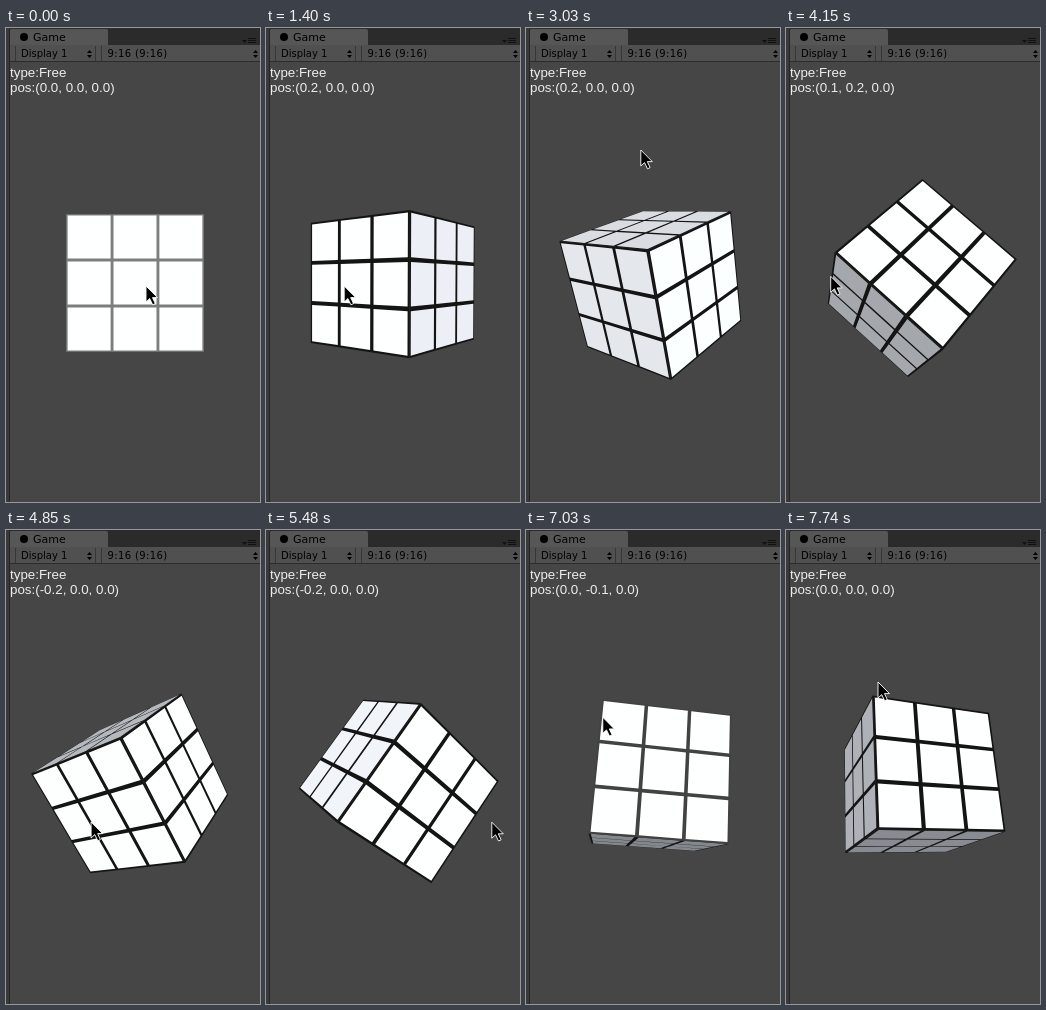
An HTML page that plays this animation: 254 px wide and 474 px high, repeating every 7.99 s.

```html
<!DOCTYPE html>
<html lang="en">
<head>
<meta charset="utf-8">
<title>Cube rotation</title>
<style>
html, body { margin: 0; width: 100%; height: 100%; overflow: hidden; background: #464646; }
svg { display: block; width: 254px; height: 474px; }
.ui { font: 10px "DejaVu Sans", sans-serif; fill: #000; }
.tab { font-size: 11px; }
.ratio { letter-spacing: .37px; }
.log { font: 13.35px "Liberation Sans", Arial, sans-serif; fill: #ececec; }
</style>
</head>
<body>
<svg viewBox="0 0 254 474">
  <rect width="254" height="474" fill="#464646"/>
  <rect width="254" height="17" fill="#2b2b2b"/>
  <path d="M4 17V2Q4 1 6 1H100Q102 1 102 3V17Z" fill="#565656"/>
  <rect y="17" width="254" height="16" fill="#505050"/>
  <path d="M4 33.5H254" stroke="#2c2c2c"/>
  <rect width="3" height="474" fill="#3a3a3a"/>
  <path d="M3.5 2V474" stroke="#242424"/>
  <path d="M9.5 18V33M89.5 18V33M95.5 18V33" stroke="#363636"/>
  <g class="ui">
    <circle cx="18" cy="9" r="4"/>
    <text class="tab" x="27" y="13">Game</text>
    <text x="15" y="29">Display 1</text>
    <text class="ratio" x="101.5" y="29">9:16 (9:16)</text>
    <path d="M81 25L83.5 22L86 25ZM81 27H86L83.5 30ZM247 25L249.5 22L252 25ZM247 27H252L249.5 30Z"/>
    <path d="M236 12H241L238.5 15ZM242 10H250V11H242ZM242 12H250V13H242ZM242 14H250V15H242Z" fill="#111"/>
  </g>
  <g id="cube"></g>
  <text class="log" x="4" y="49">type:Free</text>
  <text class="log" id="pos" x="4" y="64"></text>
  <path id="cursor" d="M0 0V16L3.7 12.6L6.7 18.8L9.3 17.6L6.5 11.6H11.5Z" stroke="#fff" stroke-width=".9"/>
</svg>
<script>
const LOOP = 7990, STEP = 10, HALF = 1.53, DIST = 10, FOCAL = 381, CX = 129, CY = 255;
const DRAG = 0.0096; // radians per pixel
const IDLE = 240, PRESS = 1170;

// Turning points of the drag: time, x, y
const drag = [
  [PRESS, 140, 258], [1630, 17, 258], [1810, 17, 258], [2270, 138, 258], [2330, 138, 258],
  [2880, 150, 122], [3150, 87, 122], [3330, 87, 122], [3840, 60, 218], [4030, 60, 218],
  [4330, 22, 293], [4480, 2, 292], [5480, 226, 292], [5870, 165, 358], [6250, 105, 250],
  [6400, 48, 266], [7210, 85, 165], [7390, 85, 165], [7680, 92, 152], [LOOP, 92, 152]
];

// Cube attitudes: time, yaw, pitch, roll in degrees
const poses = [
  [PRESS, 0, 0, 0], [2330, 13.7, 2.7, 1.1], [3030, 45.4, 21.7, 8], [4150, -15.8, -23.6, -43.9],
  [5480, -28.8, 12.4, 33.2], [6400, 20.7, 5.2, 2.6], [7740, -22.8, -18, 3.5]
];

function cursorAt(t) {
  if (t <= PRESS) {
    // One small circle before the button goes down
    const a = 2 * Math.PI * Math.min(1, Math.max(0, (t - IDLE) / 740));
    return [131 + 9 * Math.cos(a), 258 - 10 * Math.sin(a)];
  }
  const i = drag.findIndex(k => k[0] >= t);
  const a = drag[i - 1], b = drag[i], f = (t - a[0]) / (b[0] - a[0]);
  return [a[1] + (b[1] - a[1]) * f, a[2] + (b[2] - a[2]) * f];
}

// Quaternions are [w, x, y, z]
const unit = q => { const l = Math.hypot(...q); return q.map(v => v / l); };
const inverse = ([w, x, y, z]) => [w, -x, -y, -z];
const mul = ([a, b, c, d], [e, f, g, h]) => [
  a * e - b * f - c * g - d * h, a * f + b * e + c * h - d * g,
  a * g - b * h + c * e + d * f, a * h + b * g - c * f + d * e
];

function spin(axis, degrees) {
  const a = degrees * Math.PI / 360, q = [Math.cos(a), 0, 0, 0];
  q[axis] = Math.sin(a);
  return q;
}
const attitude = ([, yaw, pitch, roll]) => mul(mul(spin(2, yaw), spin(1, pitch)), spin(3, roll));

function power(q, f) {
  if (q[0] < 0) q = q.map(v => -v);
  const a = Math.acos(Math.min(1, q[0])), s = Math.sin(a);
  const k = s < 1e-6 ? f : Math.sin(f * a) / s;
  return [Math.cos(f * a), q[1] * k, q[2] * k, q[3] * k];
}

const rotate = (q, v) => mul(mul(q, [0, ...v]), inverse(q)).slice(1);

// The 24 turns that leave a cube looking the same
const turns = [];
for (let roll = 0; roll < 360; roll += 90) {
  for (let a = 0; a < 360; a += 90) turns.push(mul(spin(2, a), spin(3, roll)));
  for (const a of [90, 270]) turns.push(mul(spin(1, a), spin(3, roll)));
}

// Roll the cube with the drag, easing each stretch onto its attitude
const track = [];
let start = attitude(poses[0]);
for (let i = 1; i < poses.length; i++) {
  const from = poses[i - 1][0], to = poses[i][0], run = [];
  let q = start, len = 0, last = cursorAt(from);
  for (let t = from; t <= to; t += STEP) {
    const p = cursorAt(t), dx = p[0] - last[0], dy = p[1] - last[1];
    q = unit(mul([1, DRAG * dy / 2, -DRAG * dx / 2, 0], q));
    len += Math.hypot(dx, dy);
    run.push([q, len]);
    last = p;
  }
  const goal = attitude(poses[i]);
  const fixes = turns.map(s => mul(mul(goal, s), inverse(q)));
  const fix = fixes.reduce((a, b) => Math.abs(b[0]) > Math.abs(a[0]) ? b : a);
  run.forEach(([r, l], n) => { track[(from - PRESS) / STEP + n] = mul(power(fix, l / len), r); });
  start = mul(fix, q);
}

const $ = id => document.getElementById(id);
const cube = $("cube"), pos = $("pos"), cursor = $("cursor");
const shapes = Array.from({ length: 6 }, () => {
  const el = document.createElementNS("http://www.w3.org/2000/svg", "path");
  cube.append(el);
  return el;
});

const project = ([x, y, z]) =>
  (CX + FOCAL * x / (z + DIST)).toFixed(2) + " " + (CY + FOCAL * y / (z + DIST)).toFixed(2);

function paint(el, d, tone, tint) {
  const rgb = [0, .4, 1].map(k => Math.min(255, Math.round(tone + tint * k)));
  el.setAttribute("d", d);
  el.setAttribute("fill", `rgb(${rgb})`);
}

function drawCube(q) {
  const axes = [[1, 0, 0], [0, 1, 0], [0, 0, 1]].map(v => rotate(q, v));
  const cell = 2 * HALF / 3;
  let used = 0;
  for (let i = 0; i < 3; i++) for (const side of [-1, 1]) {
    const n = axes[i].map(v => v * side), u = axes[(i + 1) % 3], v = axes[(i + 2) % 3];
    if (HALF + DIST * n[2] >= 0) continue;
    const at = (a, b) => project(n.map((c, k) => c * HALF + u[k] * a + v[k] * b));
    const quad = (a, b, c, d) => `M${at(a, b)}L${at(c, b)}L${at(c, d)}L${at(a, d)}Z`;
    const lit = Math.max(0, -.2 * n[1] - .98 * n[2]);
    const headOn = Math.max(0, (-n[2] - .94) / .06);
    const gap = .048 - .016 * headOn;
    let tiles = "";
    for (let a = 0; a < 3; a++) for (let b = 0; b < 3; b++) {
      const x = a * cell - HALF, y = b * cell - HALF;
      tiles += quad(x + gap, y + gap, x + cell - gap, y + cell - gap);
    }
    paint(shapes[used++], quad(-HALF, -HALF, HALF, HALF), 20 + 105 * headOn, 0);
    paint(shapes[used++], tiles, Math.min(254, 132 + 300 * lit * lit), 9);
  }
  while (used < 6) shapes[used++].setAttribute("d", "");
}

const digits = v => v.toFixed(1).replace("-0.0", "0.0");

function frame(now) {
  const t = now % LOOP, c = cursorAt(t);
  const n = Math.round((t - PRESS) / STEP);
  drawCube(track[Math.max(0, Math.min(track.length - 1, n))]);
  cursor.setAttribute("transform", `translate(${c[0].toFixed(1)} ${c[1].toFixed(1)})`);
  // The log shows the drag speed
  const p = t > PRESS ? cursorAt(Math.max(PRESS, t - 50)) : c;
  pos.textContent = `pos:(${digits((p[0] - c[0]) * .016)}, ${digits((c[1] - p[1]) * .016)}, 0.0)`;
  requestAnimationFrame(frame);
}
requestAnimationFrame(frame);
</script>
</body>
</html>
```
